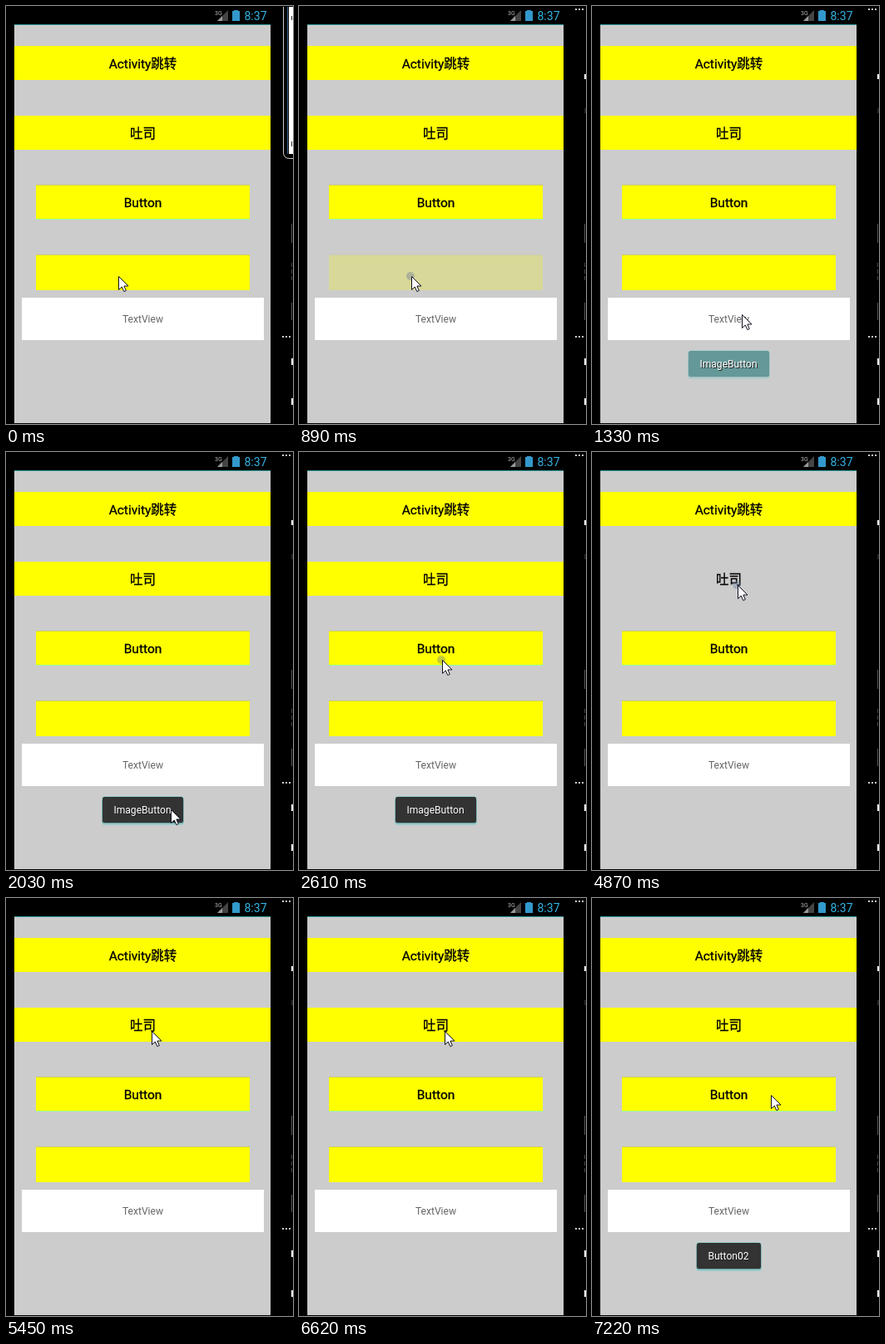
Write an HTML page that moves like this. It is 345 by 503 pixels and loops after 8 s.

```html
<!DOCTYPE html>
<html lang="zh">
<head>
<meta charset="utf-8">
<style>
html, body { margin: 0; width: 100%; height: 100%; overflow: hidden; background: #000; }
svg { display: block; width: 345px; height: 503px; }
text { font-family: Roboto, "Noto Sans CJK SC", "Noto Sans CJK", sans-serif; }
.label { font-size: 15.5px; text-anchor: middle; stroke: #000; stroke-width: .3px; }
.small { font-size: 12.1px; text-anchor: middle; }
</style>
</head>
<body>
<svg viewBox="0 0 345 503">
  <rect width="345" height="503"/>

  <!-- status bar -->
  <text x="251" y="11" font-size="7" fill="#bbb">3G</text>
  <path d="M267 5V18H254Z" fill="#444"/>
  <path d="M260 12V18H254Z" fill="#999"/>
  <path d="M274 5h5v1h2V18h-9V6h2z" fill="#39c"/>
  <text x="286.5" y="17" font-size="14" fill="#33b5e5">8:37</text>

  <!-- screen -->
  <rect x="10" y="22" width="308" height="480" fill="#ccc"/>
  <rect x="10" y="22" width="308" height="1" fill="#399"/>
  <rect x="10" y="48" width="308" height="41" fill="#ff0"/>
  <rect id="second" x="10" y="132" width="308" height="41" fill="#ff0"/>
  <g id="third">
    <rect x="36" y="215" width="257" height="1" fill="#cc6"/>
    <rect x="36" y="216" width="257" height="40" fill="#ff0"/>
    <rect x="36" y="256" width="257" height="1" fill="#9f9"/>
  </g>
  <g id="fourth">
    <rect x="36" y="299" width="257" height="1" fill="#cc6"/>
    <rect x="36" y="300" width="257" height="42" fill="#ff0"/>
  </g>
  <rect x="19" y="351" width="291" height="51" fill="#fff"/>
  <text class="label" x="164.5" y="75">Activity跳转</text>
  <text class="label" x="164.5" y="158.5">吐司</text>
  <text class="label" x="164.5" y="242">Button</text>
  <text class="small" x="164.5" y="381" fill="#666">TextView</text>

  <g id="toast">
    <rect id="halo" y="414" height="35" rx="4" fill="#9cc"/>
    <rect id="shade" y="417" height="30" rx="3" fill="#699"/>
    <rect id="body" y="415" height="31" rx="2.5"/>
    <text id="shadow" class="small" x="165" y="436" fill="#222"></text>
    <text id="message" class="small" x="164" y="435" fill="#fff"></text>
  </g>

  <!-- neighbouring window edge -->
  <g id="frame" fill="none">
    <path d="M333.5 1V177Q334 183.5 341 183.5H345" stroke="#ccc"/>
    <path d="M338.5 1V178" stroke="#369"/>
    <path d="M340 1H345V178H340Z" fill="#fff"/>
    <path d="M343.5 12V17M343.5 163V169" stroke="#333"/>
  </g>
  <g id="edge">
    <path d="M332 4H342" stroke="#ccc" stroke-width="2" stroke-dasharray="2"/>
    <path d="M344 82V88" stroke="#fff" stroke-width="2"/>
    <path d="M344 123V129" stroke="#444"/>
  </g>
  <path d="M332 398H342" stroke="#ccc" stroke-width="2" stroke-dasharray="2"/>
  <path d="M343.5 262V285M343.5 357V378" stroke="#555"/>
  <path d="M343.5 309V331" stroke="#444" stroke-dasharray="5 3"/>
  <path d="M344 424V432M344 472V480" stroke="#fff" stroke-width="2"/>

  <circle id="touch" r="5" fill="#679" opacity=".38"/>
  <path id="cursor" d="M.5 .5V16.5L4.3 13L6.8 18.6L9.3 17.5L6.9 12H12Z" fill="#fff" stroke="#112" stroke-linejoin="round"/>
</svg>
<script>
const LOOP = 8000, FADE = 200;
const $ = id => document.getElementById(id);
const set = (id, attrs) => {
  for (const name in attrs) $(id).setAttribute(name, attrs[name]);
};
const show = (id, on) => $(id).style.display = on ? "" : "none";

const ramp = (t, from, length) => Math.min(1, Math.max(0, (t - from) / length));
const smooth = k => k * k * (3 - 2 * k);

const home = { x: 135, y: 325 };
const moves = [
  { from: 1200, to: 1330, x: 180, y: 371 },
  { from: 1330, to: 1710, x: 198, y: 430 },
  { from: 2030, to: 2550, x: 172, y: 250 },
  { from: 3180, to: 3300, x: 172, y: 241 },
  { from: 4300, to: 4420, x: 160, y: 152 },
  { from: 4540, to: 4600, x: 175, y: 160 },
  { from: 6870, to: 7220, x: 215, y: 237 }
];
const presses = [
  { id: "fourth", touch: 700, down: 740, up: 1050 },
  { id: "third", touch: 2600, down: 2960, up: 3180 },
  { id: "second", touch: 4630, down: 4650, up: 5250 },
  { id: "second", touch: 6680, down: 6690, up: 6780 }
];
const toasts = [
  { label: "ImageButton", from: 1230, to: 2960 },
  { label: "Button02", from: 6820, to: LOOP }
];

function cursorAt(t) {
  const pos = { ...home };
  for (const m of moves) {
    const k = smooth(ramp(t, m.from, m.to - m.from));
    pos.x += (m.x - pos.x) * k;
    pos.y += (m.y - pos.y) * k;
  }
  return { x: Math.round(pos.x), y: Math.round(pos.y) };
}

function drawPresses(t, cursor) {
  const opacity = { second: 1, third: 1, fourth: 1 };
  for (const p of presses) opacity[p.id] += ramp(t, p.up, FADE) - ramp(t, p.down, FADE);
  for (const id in opacity) set(id, { opacity: opacity[id] });
  show("touch", presses.some(p => t >= p.touch && t < p.up));
  set("touch", { cx: cursor.x - 1, cy: cursor.y });
}

function drawToast(t) {
  const toast = toasts.find(o => t >= o.from && t < o.to + 500);
  show("toast", toast);
  if (!toast) return;
  const alpha = Math.sqrt(ramp(t, toast.from, 400)) * (1 - ramp(t, toast.to, 500));
  const text = Math.min(1, alpha * 2);
  $("message").textContent = $("shadow").textContent = toast.label;
  const width = Math.round($("message").getComputedTextLength()) + 28;
  const box = pad => ({ x: Math.round(164 - width / 2) - pad, width: width + pad * 2 });
  // Darkens from the screen grey through teal
  const red = Math.max(51, 204 - 204 * alpha), cyan = Math.min(204, 255 - 204 * alpha);
  set("halo", { ...box(1), opacity: alpha });
  set("shade", { ...box(.5), opacity: alpha * alpha });
  set("body", { ...box(0), fill: `rgb(${red},${cyan},${cyan})` });
  set("message", { opacity: text });
  set("shadow", { opacity: text });
}

function draw(t) {
  const cursor = cursorAt(t);
  set("cursor", { transform: `translate(${cursor.x} ${cursor.y})` });
  drawPresses(t, cursor);
  drawToast(t);
  show("frame", t < 360);
  show("edge", t >= 360);
}

const start = performance.now();
function tick() {
  draw((performance.now() - start) % LOOP);
  requestAnimationFrame(tick);
}
tick();
</script>
</body>
</html>
```
